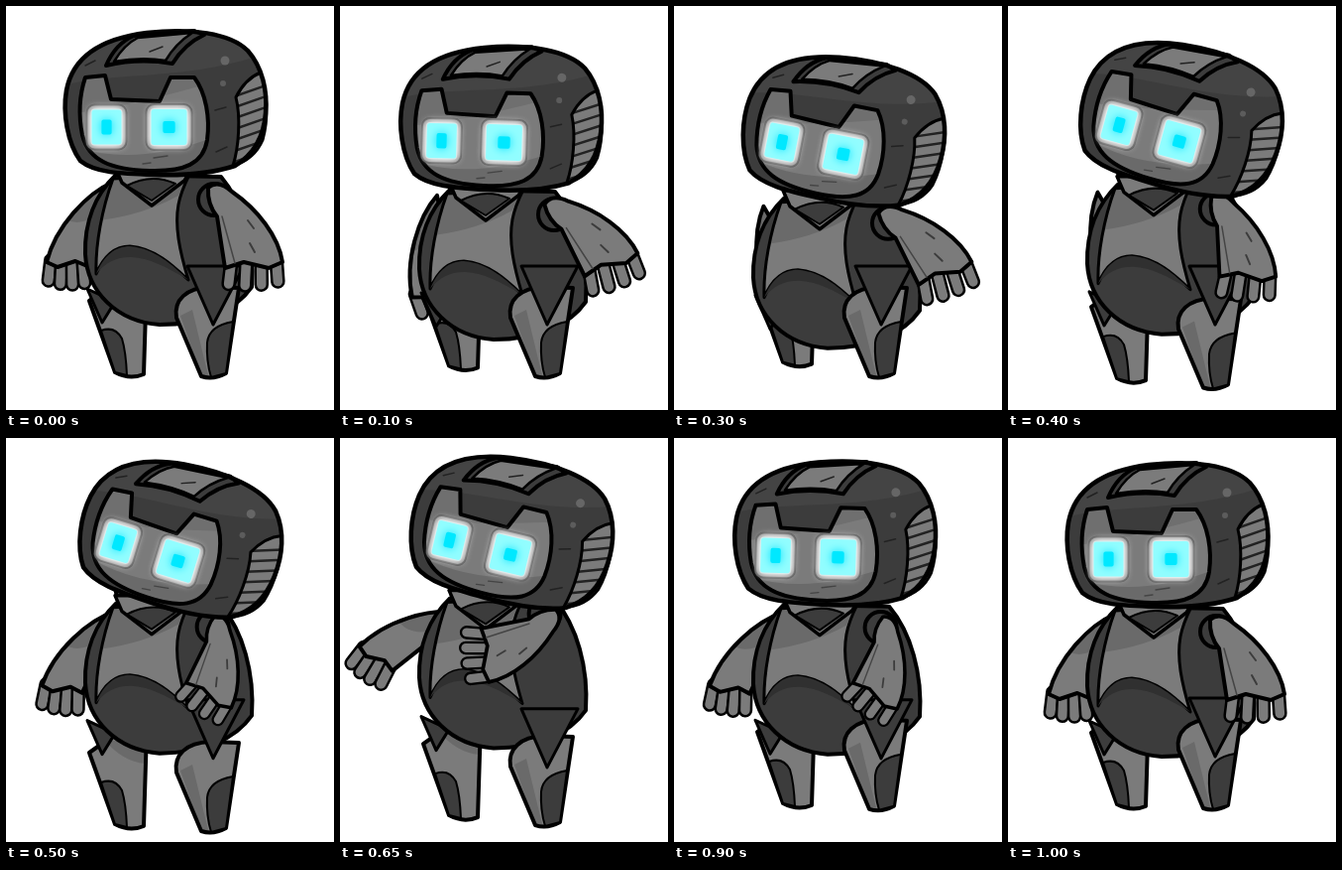
Write an HTML page with a canvas that moves like this. It is 331 by 407 pixels and loops after 1050 ms.

```html
<!DOCTYPE html>
<html lang="en">
<head>
<meta charset="utf-8">
<title>Hopping robot</title>
<style>
html, body { margin: 0; width: 100%; height: 100%; overflow: hidden; background: #fff; }
canvas { display: block; width: 331px; height: 407px; }
</style>
</head>
<body>
<canvas id="stage"></canvas>
<script>
const W = 331, H = 407, LOOP = 1050, STEP = 50;
const LIGHT = '#7b7b7b', DARK = '#3c3c3c', INK = '#000', SHADE = 'rgba(0,0,0,.14)';
const canvas = document.getElementById('stage');
const ctx = canvas.getContext('2d');
const dpr = window.devicePixelRatio || 1;
canvas.width = W * dpr;
canvas.height = H * dpr;

// Eased 0..1 ramp, and a rise and fall built from two of them
function ramp(t, from, to) {
  const u = Math.min(1, Math.max(0, (t - from) / (to - from)));
  return u * u * (3 - 2 * u);
}
const bump = (t, from, peak, to) => ramp(t, from, peak) - ramp(t, peak, to);

function shape(d, fill, width = 4, stroke = INK) {
  const p = typeof d === 'string' ? new Path2D(d) : d;
  if (fill) { ctx.fillStyle = fill; ctx.fill(p); }
  if (width) { ctx.lineWidth = width; ctx.strokeStyle = stroke; ctx.stroke(p); }
}

// Draws a part moved by (dx, dy), then turned and scaled about (px, py)
function place(draw, dx, dy, px = 0, py = 0, turn = 0, size = 1) {
  ctx.save();
  ctx.translate(px + dx, py + dy);
  ctx.rotate(turn * Math.PI / 180);
  ctx.scale(size, size);
  ctx.translate(-px, -py);
  draw();
  ctx.restore();
}

function inside(d, draw) {
  ctx.save();
  ctx.clip(new Path2D(d));
  draw();
  ctx.restore();
}

function dot(x, y, r, fill, width = 0) {
  const p = new Path2D();
  p.arc(x, y, r, 0, 7);
  shape(p, fill, width);
}

function eye(x, y, w, h) {
  const box = (g, r) => {
    const p = new Path2D();
    p.roundRect(x - w / 2 - g, y - h / 2 - g, w + 2 * g, h + 2 * g, r);
    return p;
  };
  ctx.save();
  shape(box(5, 8), '#8b8b8b', 2, '#505050');
  ctx.shadowColor = '#fff';
  ctx.shadowBlur = 9 * dpr;
  shape(box(1, 4), '#c8dede', 0);
  shape(box(0, 3), '#92fdff', 0);
  ctx.shadowColor = '#00e4ff';
  ctx.shadowBlur = 10 * dpr;
  shape(box(-w * .33, 2), '#00e8ff', 0);
  ctx.restore();
}

const skull = 'M75 156C62 138 57 108 61 85C67 53 94 33 142 27C186 22 226 27 244 45C259 62 264 86 262 108C260 134 248 151 231 161C210 168 180 171 150 170C115 169 90 168 75 156Z';
const face = 'M80 72L100 70L106 94L155 96L166 72L190 72C202 88 206 113 203 135C199 159 180 167 145 166C105 165 83 155 77 130C73 110 74 90 80 72Z';
const vent = 'M229 161C235 142 237 112 232 92C238 80 247 71 257 67C264 86 265 114 259 135C253 149 243 157 229 161Z';

function drawHead() {
  shape(skull, DARK, 0);
  inside(skull, () => shape('M50 84C90 64 180 78 260 48V10H50Z', '#444', 0));
  shape('M101 60C107 46 117 35 129 30L190 25L200 29C187 35 176 45 168 58C145 54 122 55 101 60Z', DARK);
  shape('M109 56C115 46 123 37 133 32L188 27C177 34 168 43 161 55C143 52 126 53 109 56Z', LIGHT, 2.5);
  shape('M145 46L158 41M212 147L223 142M211 105L222 102M80 60L90 55', null, 1.5, '#222');
  dot(221, 55, 4.5, '#666');
  dot(219, 78, 3, '#5c5c5c');

  inside(vent, () => {
    shape(vent, LIGHT, 0);
    for (let y = 84; y < 180; y += 11) shape(`M228 ${y + 8}L268 ${y - 6}`, null, 2.5, '#222');
  });
  shape(vent, null, 3);
  shape(skull, null, 4.5);

  shape(face, LIGHT, 0);
  inside(face, () => {
    shape('M70 108Q130 100 205 78V60H70Z', 'rgba(0,0,0,.1)', 0);
    shape('M70 142Q130 162 210 132V175H70Z', SHADE, 0);
  });
  shape(face, null, 4);
  shape('M149 153L163 151M138 159L146 158', null, 1.3, '#444');
  eye(101.5, 122, 30, 35);
  eye(164.5, 122, 36, 36);
}

const belly = 'M111 170C90 190 79 218 80 250C82 288 112 318 155 321C200 321 232 306 248 283C251 240 239 198 217 172Z';

function drawBody() {
  shape('M110 154L115 178L147 201L186 176L190 154Z', LIGHT);
  shape(belly, DARK, 0);
  inside(belly, () => {
    shape('M108 174C97 204 90 240 91 270C99 251 110 242 125 242C150 244 168 261 184 276C175 246 170 222 174 200C176 189 180 180 185 170Z', LIGHT, 3);
    shape('M95 216Q140 210 174 191L184 170H110Z', SHADE, 0);
    shape('M91 270C99 251 110 242 125 242C150 244 168 261 184 276C160 262 145 254 126 253C110 253 100 259 91 270Z', '#303030', 0);
  });
  shape(belly, null, 4);
  shape('M110 162L117 178L147 201L180 176L188 162Z', LIGHT, 3.5);
  shape('M122 181Q147 168 171 179L147 196Z', DARK, 2);
}

function drawFarLeg() {
  shape('M84 297L110 369Q125 377 139 371L142 275L108 280Z', LIGHT);
  shape('M96 327Q110 322 117 335Q121 348 122 372L110 369Z', DARK, 2);
  shape('M100 285H141L140 308Q118 306 100 285Z', SHADE, 0);
}

function drawNearLeg() {
  shape('M172 314C169 296 182 284 206 283L235 284L222 370Q209 377 197 373Z', LIGHT);
  shape('M229 318Q205 322 203 339Q202 358 207 374L222 370Z', DARK, 2);
  shape('M176 312L188 306L204 372L197 373Z', SHADE, 0);
}

// A splayed row of fingers along the line from (x1, y1) to (x2, y2)
function drawFingers(x1, y1, x2, y2) {
  for (let i = 0; i < 4; i++) {
    const u = (i + .4) / 3.8, x = x1 + (x2 - x1) * u, y = y1 + (y2 - y1) * u;
    const finger = `M${x} ${y - 4}L${x + (u - .6) * 5} ${y + 15 + 4 * Math.sin(u * Math.PI)}`;
    shape(finger, null, 14.5);
    shape(finger, null, 9.5, LIGHT);
  }
}

function drawFarArm() {
  drawFingers(41, 260, 82, 263);
  shape('M109 177C82 188 50 222 41 258L52 263L70 257L82 262L97 222Z', LIGHT);
  shape('M109 177C90 184 72 200 60 215Q78 224 97 205Z', SHADE, 0);
}

function drawNearArm() {
  drawFingers(221, 264, 279, 261);
  shape('M204 183Q214 174 228 187C254 205 275 232 279 258L265 264L240 258L221 264L213 212Q203 200 204 183Z', LIGHT);
  shape('M218 212L231 259', null, 1.5, '#444');
  shape('M244 216L250 224M246 239L251 248', null, 2, DARK);
}

function draw(t) {
  const lean = Math.sin(Math.PI * Math.min(t, 1000) / 1000) ** 2;
  const crouch = bump(t, 0, 200, 540);
  const hop = bump(t, 300, 700, 1000);
  const dangle = bump(t, 300, 500, 950);
  const lift = bump(t, 0, 200, 400);
  const sweep = bump(t, 340, 750, 1000);
  const fling = sweep * sweep;
  const back = ramp(t, 0, 180) - ramp(t, 400, 500);
  const body = 30 * crouch - 9 * hop;
  const armX = 12 * lift - 4 * sweep, armY = body - 13 * fling;

  ctx.setTransform(dpr, 0, 0, dpr, 0, 0);
  ctx.fillStyle = '#fff';
  ctx.fillRect(0, 0, W, H);
  ctx.lineJoin = ctx.lineCap = 'round';

  place(drawFarArm, 0, body, 101, 200, 43 * fling - 45 * back);
  place(drawFarLeg, 0, 24 * dangle - 13 * crouch - 7 * hop);
  place(() => shape('M82 285L97 319L110 298Z', DARK, 3), 0, 8 * crouch - 6 * fling);
  place(drawBody, 0, body);
  place(drawNearLeg, 0, 23 * dangle);
  place(() => shape('M183 262H240L209 321Z', DARK, 3), 0, 15 * fling);
  place(() => dot(210, 195, 16, DARK, 4), armX, armY);
  place(drawNearArm, armX, armY, 209, 196, 103 * sweep - 35 * lift, 1 - .5 * sweep * (1 - sweep));
  place(drawHead, 10.5 * lean, body - 4 * lean, 132.5, 122, 17 * lean);
}

const start = performance.now();
function tick() {
  const t = (performance.now() - start) % LOOP;
  draw(Math.floor(t / STEP) * STEP);
  requestAnimationFrame(tick);
}
tick();
</script>
</body>
</html>
```
